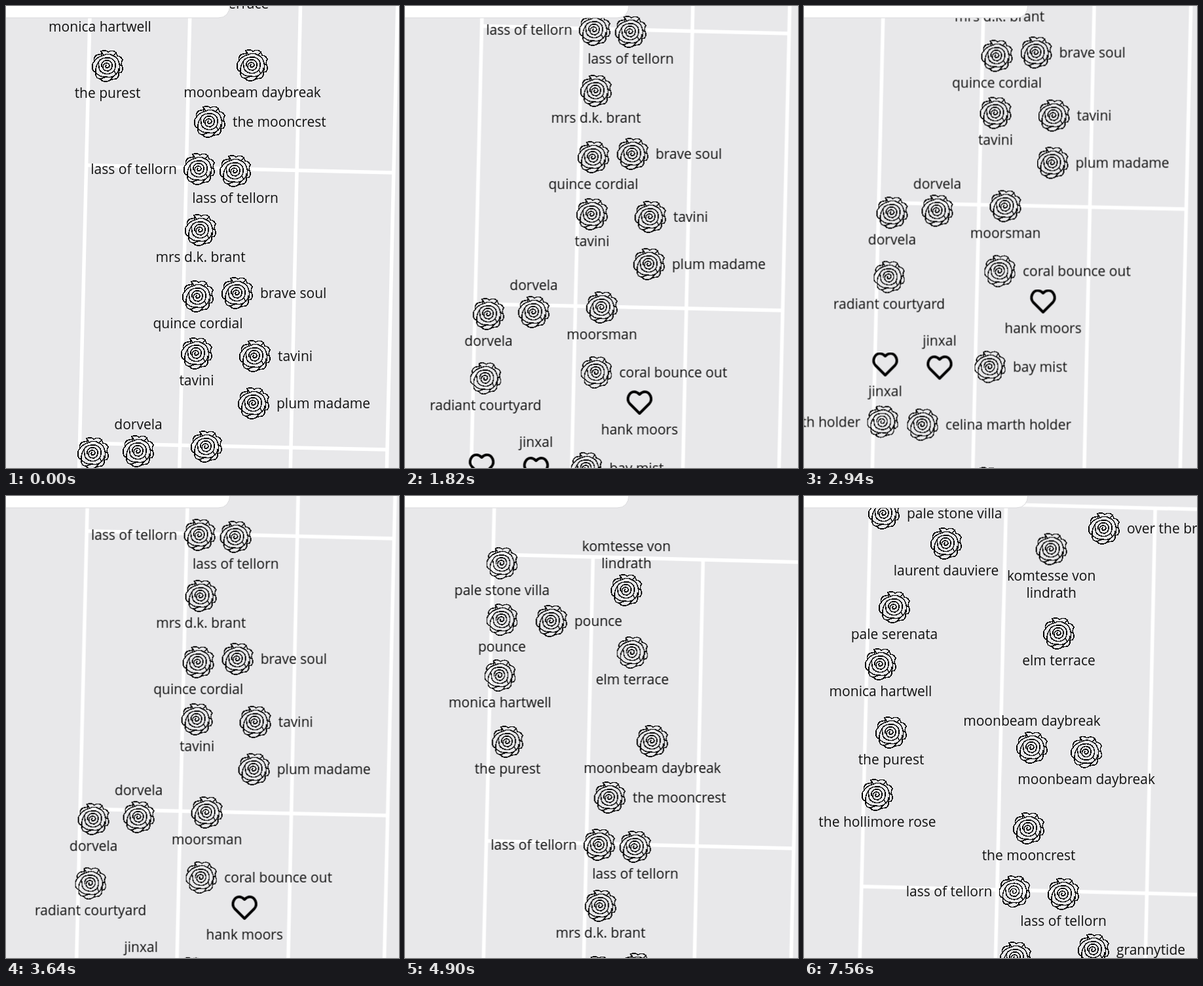
These frames come from a looping animation (600x704 px, 7630 ms). An HTML page:

```html
<!DOCTYPE html>
<html lang="en">
<head>
<meta charset="utf-8">
<title>Rose garden map</title>
<style>
html, body { margin: 0; width: 100%; height: 100%; overflow: hidden; background: #e8e8ea; }
svg { display: block; width: 600px; height: 704px; }
text { font: 21px "Open Sans", "Noto Sans", sans-serif; fill: #111; text-anchor: middle; }
.right { text-anchor: start; }
.left { text-anchor: end; }
.rose { fill: none; stroke: #000; stroke-width: 1.5; stroke-linejoin: round; shape-rendering: crispEdges; }
.heart { fill: none; stroke: #000; stroke-width: 4; stroke-linejoin: round; }
#grid path { fill: none; stroke: #fff; stroke-width: 5.5; vector-effect: non-scaling-stroke; }

#map, #grid, .spot, .old, .new, .far, .near, #hand {
  animation: 7630ms linear infinite;
}
#map { animation-name: pan; }
#grid { animation-name: grow; transform-origin: 229px 50px; }
.spot { animation-name: spread; }
.old { animation-name: leave; }
.new { animation-name: enter; }
.far { animation-name: before; }
.near { animation-name: after; }
#hand { animation-name: cursor; }

@keyframes pan {
  0%, .917% { transform: translate(0, 0); animation-timing-function: ease-in-out; }
  10.092% { transform: translate(-3px, -105px); }
  13.761% { transform: translate(-3px, -105px); animation-timing-function: cubic-bezier(.35, 0, .7, .65); }
  23.853% { transform: translate(-5.5px, -212px); animation-timing-function: cubic-bezier(.3, .35, .6, 1); }
  38.532%, 40.367% { transform: translate(1.5px, -366.5px); animation-timing-function: cubic-bezier(.4, 0, .7, .78); }
  55.046% { transform: translate(-1px, 115px); animation-timing-function: cubic-bezier(.3, .4, .6, .96); }
  64.22% { transform: translate(1.5px, 283px); animation-timing-function: ease-out; }
  66.055%, 100% { transform: translate(3px, 286px); }
}
@keyframes grow {
  0%, 66.97% { transform: scale(1); animation-timing-function: ease-in-out; }
  77.06%, 100% { transform: scale(1.355, 1.345); }
}
@keyframes spread {
  0%, 66.97% { transform: translate(var(--x), var(--y)); animation-timing-function: ease-in-out; }
  77.06%, 100% { transform: translate(var(--zx), var(--zy)); }
}
@keyframes leave { 0%, 78.1% { opacity: 1; } 82%, 100% { opacity: 0; } }
@keyframes enter { 0%, 77.85% { opacity: 0; } 81.78%, 100% { opacity: 1; } }
@keyframes before { 0%, 73.4% { opacity: 1; } 75%, 100% { opacity: 0; } }
@keyframes after { 0%, 73.4% { opacity: 0; } 75%, 100% { opacity: 1; } }
@keyframes cursor {
  0%, 66.05% { opacity: 0; }
  66.06%, 87.15% { opacity: 1; }
  87.16%, 100% { opacity: 0; }
}
</style>
</head>
<body>
<svg viewBox="0 0 600 704">
  <defs>
    <g id="rose" class="rose">
      <path d="M-9-17L-10-22Q-4-25 1-21Q8-25 13-20L15-15Q21-14 23-9Q20-4 22 0Q25 6 21 10L17 11Q18 17 13 20Q8 20 4 22Q-2 26-8 23L-11 20Q-17 20-18 14L-18 10Q-24 8-23 1Q-24-3-20-7Q-22-12-17-16Q-13-18-9-17"/>
      <path d="M-20-7Q-15-14-6-16Q2-20 9-15Q15-13 17-6Q20 0 17 11M-18 10Q-19 2-14-5M-18 10Q-12 18-2 17Q8 19 13 13Q17 9 17 4"/>
      <path d="M-14-5Q-11-12-2-12Q7-13 11-6Q14 1 10 8Q4 14-4 12Q-13 10-13 2L-14-5"/>
      <path d="M-9 2Q-10-6-3-8Q5-9 7-2Q8 5 1 8Q-6 8-7 3Q-7-3-2-4Q3-4 3 0Q2 4-2 3Q-4 1-2-1"/>
      <path d="M-10-22L-6-16M13-20L9-15M22 0L18-2M4 22L8 17M-11 20L-2 17M10 8L13 13"/>
    </g>
    <path id="heart" class="heart" d="M0 17L-15 2C-21-5-16-16-8-16C-4-16-2-14 0-12C2-14 4-16 8-16C16-16 21-5 15 2Z"/>
  </defs>
  <rect width="600" height="704" fill="#e8e8ea"/>
  <g id="map">
    <g id="grid">
      <path d="M136-320L101 1150M285.5-190L254.500 1150M453.500-186L424.700 1150M602-182L571 1150"/>
      <path d="M133-194L650-181M121.500 242.500L592 254M112 666L582 676"/>
    </g>
    <g id="spots"></g>
  </g>
  <g id="hand">
    <path transform="translate(232 336)" fill="#fff" stroke="#000" stroke-width="1.4" stroke-linejoin="round"
      d="M-4 11L-10 2Q-11-1-8-1L-5 2L-8-6Q-8-9-5-8L-3-2V-9Q-2-12 0-9L1-2L3-9Q5-11 6-8L5-1L8-5Q11-6 10-3L8 4L6 11Z"/>
  </g>
  <path d="M-2-2H342Q341 18 324 18H-2Z" fill="#fff" stroke="#d9d9db" stroke-width="1"/>
</svg>
<script>
const NS = "http://www.w3.org/2000/svg";
const layer = document.getElementById("spots");
const END = { x: 3, y: 286 };
const LABEL = { below: [0, 49], above: [0, -33], right: [35, 8], left: [-34, 8] };

function add(parent, tag, attrs, content = "") {
  const el = document.createElementNS(NS, tag);
  for (const key in attrs) el.setAttribute(key, attrs[key]);
  el.textContent = content;
  return parent.appendChild(el);
}

function label(parent, name, side, phase = "") {
  const [dx, dy] = LABEL[side];
  const lines = name.split("|");
  const lift = side === "above" ? (lines.length - 1) * 26 : 0;
  lines.forEach((line, i) =>
    add(parent, "text", { x: dx, y: dy - lift + i * 26, class: side + " " + phase }, line));
}

function spot(x, y, name, side, { icon = "rose", near, fade = "", zoomed } = {}) {
  const [zx, zy] = zoomed
    ? [zoomed[0] - END.x, zoomed[1] - END.y]
    : [229 + 1.355 * (x - 229), 50 + 1.345 * (y - 50)];
  const outer = add(layer, "g", { class: fade });
  const g = add(outer, "g", {
    class: "spot",
    style: `--x:${x}px;--y:${y}px;--zx:${zx}px;--zy:${zy}px`
  });
  add(g, "use", { href: "#" + icon });
  label(g, name, side, near ? "far" : "");
  if (near) label(g, name, near, "near");
}

// Appears only after zooming in; placed in stage coordinates.
function closeUp(x, y, name, side) {
  const fade = add(layer, "g", { class: "new" });
  const g = add(fade, "g", { transform: `translate(${x - END.x} ${y - END.y})` });
  add(g, "use", { href: "#rose" });
  label(g, name, side);
}

const heart = { icon: "heart" };

closeUp(122, 26, "pale stone villa", "right");
closeUp(217, 72, "laurent dauviere", "below");
closeUp(458, 49, "over the brook", "right");
closeUp(138, 169, "pale serenata", "below");
closeUp(133, 360, "the purest", "below");
closeUp(112, 455, "the hollimore rose", "below");
closeUp(348, 383, "moonbeam daybreak", "above");
closeUp(343, 506, "the mooncrest", "below");
closeUp(442, 691, "grannytide", "right");
closeUp(323, 703, "", "below");

spot(146.5, -181, "pale stone villa", "below", { fade: "old", zoomed: [146, 28] });
spot(336.5, -140, "komtesse von|lindrath", "above", { near: "below" });
spot(146.5, -95, "pounce", "below", { fade: "old", zoomed: [122, 142] });
spot(222, -93, "pounce", "right", { fade: "old", near: "below", zoomed: [224, 144] });
spot(345.5, -45, "elm terrace", "below", { zoomed: [389, 209] });
spot(143.5, -10, "monica hartwell", "below", { zoomed: [117, 256] });
spot(155, 91, "the purest", "below", { fade: "old", zoomed: [132, 391] });
spot(376, 90, "moonbeam daybreak", "below");
spot(311, 176, "the mooncrest", "right", { fade: "old", zoomed: [371, 505] });
spot(295, 248, "lass of tellorn", "left");
spot(350, 251, "lass of tellorn", "below", { zoomed: [396, 606] });
spot(297, 341, "mrs d.k. brant", "below", { fade: "old" });
spot(293, 442, "quince cordial", "below");
spot(353, 437, "brave soul", "right");
spot(291, 529, "tavini", "below");
spot(380, 533, "tavini", "right");
spot(378, 605, "plum madame", "right");
spot(133, 681, "dorvela", "below");
spot(202, 678, "dorvela", "above");
spot(306, 671, "moorsman", "below");
spot(297.5, 770, "coral bounce out", "right");
spot(128.5, 779, "radiant courtyard", "below");
spot(363.5, 816, "hank moors", "below", heart);
spot(122.5, 912, "jinxal", "below", heart);
spot(205.5, 917, "jinxal", "above", heart);
spot(282.5, 916, "bay mist", "right");
spot(118.5, 999.5, "celina marth holder", "left");
spot(179.5, 1004, "celina marth holder", "right");
spot(277.5, 1093, "", "below");
</script>
</body>
</html>
```
